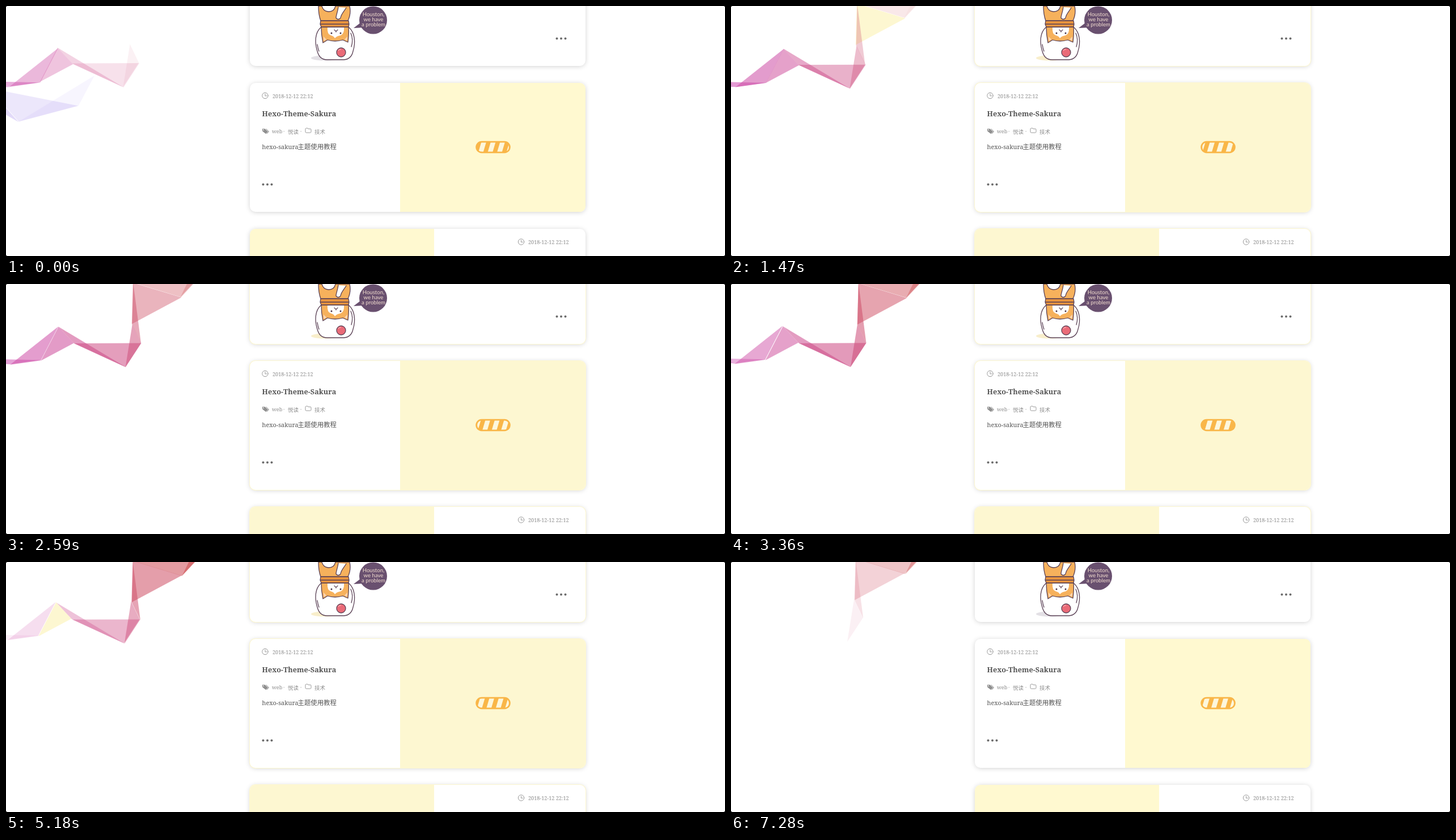
These frames come from a looping animation (1268x442 px, 7350 ms). An HTML page with a canvas:

```html
<!DOCTYPE html>
<html lang="zh">
<head>
<meta charset="utf-8">
<title>Blog cards</title>
<style>
  html, body { margin: 0; width: 100%; height: 100%; overflow: hidden; background: #fff; }
  #stage { position: relative; width: 1268px; height: 442px; overflow: hidden; --pale: #fff9d0; }
  #stage.warm { --pale: #fdf7d1; }
  canvas, svg { position: absolute; left: 0; top: 0; }
  .card {
    position: absolute; left: 430px; width: 592px; height: 228px;
    border-radius: 10px; background: #fff; overflow: hidden;
    box-shadow: 0 1px 10px -1px rgba(0, 0, 0, .22);
  }
  .warm .card { box-shadow: 0 0 0 1px var(--pale), 0 1px 10px -1px rgba(0, 0, 0, .22); }
  .cover { position: absolute; top: 0; bottom: 0; background: var(--pale); }
  text { font-family: "Noto Serif", "Noto Sans CJK SC", serif; fill: #8c8c8c; }
  .meta { font-size: 9.1px; }
  .cjk { font-family: "Noto Sans CJK SC", "Noto Sans CJK", sans-serif; font-weight: 300; }
  .tag { font-size: 9.5px; }
  .body { fill: #555; }
  .title { font-size: 12.7px; font-weight: 700; fill: #555; }
  .say { font: 9.6px Lato, sans-serif; fill: #f4dfd0; text-anchor: middle; }
  .line { fill: none; stroke: #999; stroke-width: 1; stroke-linecap: round; stroke-linejoin: round; }
  .ink { stroke: #5b4256; stroke-width: 1.3; stroke-linecap: round; stroke-linejoin: round; }
  #ground { fill: #e3e0e5; }
  .warm #ground { fill: #f8eecb; }
</style>
</head>
<body>
<div id="stage">
  <canvas id="ribbons" width="400" height="260"></canvas>
  <div class="card" style="top:-122px"></div>
  <div class="card" style="top:136px"><div class="cover" style="left:265px;right:0"></div></div>
  <div class="card" style="top:394px"><div class="cover" style="left:0;width:325px"></div></div>

  <svg width="1268" height="442" viewBox="0 0 1268 442">
    <defs>
      <g id="clock" class="line"><circle r="5.2"/><path d="M0-3V.4H2.8"/></g>
      <g id="dots" fill="#6c6c6c"><circle r="2"/><circle cx="7.5" r="2"/><circle cx="15" r="2"/></g>
      <clipPath id="inner"><rect x="831" y="241.5" width="56" height="16" rx="8"/></clipPath>
    </defs>

    <!-- cat in the jar -->
    <ellipse id="ground" cx="563" cy="92" rx="25" ry="4.6"/>
    <g class="ink">
      <path fill="#fff" d="M555 38C545 47 544 64 549 80Q553 95 566 95H596Q609 94 612 80C617 64 615 47 605 38Z"/>
      <path fill="#f6b15c" d="M551 0C551 9 552 18 555 26H603C607 18 608 9 606 0Z"/>
      <path fill="#fff" stroke="none" d="M557 0Q559 9 569 10Q579 10 581 0Z"/>
      <path fill="none" d="M557 0Q559 9 569 10Q579 10 581 0"/>
      <path fill="#fff" d="M586 2C585 10 582 17 582 21Q586 26 590 21C591 14 596 10 600 3"/>
      <path fill="#f6b15c" d="M556 37C556 46 557 56 559 65L567 60Q580 64 594 60L603 64C604 56 605 46 604 37Z"/>
      <path fill="#fff" stroke="none" d="M567 38Q566 50 573 52Q578 53 580 57Q583 53 590 52Q597 49 596 38Z"/>
      <path fill="#fbd5b5" stroke="none" d="M560.500 62L565 59L560 54ZM601.500 61.500L597 59L602 54Z"/>
      <path fill="#e8943f" d="M555 26H604L605 32H554ZM554 32H605L604 37H556Z"/>
      <path fill="none" d="M582 44V46M579 42Q580.500 44.500 582 44Q583.500 44.500 585 42M608 48Q613 59 609 72M549 68Q550 75 552 80"/>
      <circle cx="591" cy="82" r="8" fill="#ea6b78"/>
    </g>
    <path d="M586 79Q588 76 591 77" fill="none" stroke="#f7a9ae" stroke-width="1.300"/>
    <g fill="#4a3446"><circle cx="574" cy="48" r="1.500"/><circle cx="590" cy="48" r="1.500"/></g>
    <path fill="#69506f" d="M613 39L626 29L632 38Z"/>
    <circle cx="647.500" cy="25" r="24.500" fill="#69506f"/>
    <text class="say" x="648" y="18">Houston,</text>
    <text class="say" x="648" y="27">we have</text>
    <text class="say" x="648" y="36">a problem</text>
    <use href="#dots" x="971.500" y="57.500"/>

    <!-- post -->
    <use href="#clock" x="457" y="158.500"/>
    <text class="meta" x="470" y="162.500">2018-12-12 22:12</text>
    <text class="title" x="451.500" y="194.500">Hexo-Theme-Sakura</text>
    <g fill="#8f8f8f">
      <path d="M452 217H456.500L462 222L458 226L452 221Z"/>
      <path d="M458 217H459L464 222L460 226L459.300 225.300L462.700 222Z"/>
      <circle cx="454" cy="219" r=".9" fill="#fff"/>
    </g>
    <text class="meta" x="469" y="225">web</text>
    <text class="meta" x="489" y="225">·</text>
    <text class="cjk tag" x="497" y="225.500">悦读</text>
    <text class="meta" x="519" y="225">·</text>
    <path class="line" d="M528 217.500Q528 216 529.500 216H532L533 217.200H537Q538 217.200 538 218.500V222.500Q538 224 536.500 224H529.500Q528 224 528 222.500Z"/>
    <text class="cjk tag" x="544" y="225.500">技术</text>
    <text class="body" x="451.500" y="253" font-size="10.900">hexo-sakura</text>
    <text class="body cjk" x="514.500" y="253" font-size="11.400">主题使用教程</text>
    <use href="#dots" x="453.500" y="315.500"/>

    <!-- loader -->
    <rect x="828.200" y="238.800" width="61.600" height="21.400" rx="10.700" fill="#f9b648"/>
    <g clip-path="url(#inner)"><path id="stripes" fill="#fdf7dc"/></g>

    <use href="#clock" x="908.500" y="417"/>
    <text class="meta" x="921" y="420.500">2018-12-12 22:12</text>

    <path fill="#333" d="M0 0H2L0 2ZM1268 0V2L1266 0ZM0 442V440L2 442ZM1268 442H1266L1268 440Z"/>
  </svg>
</div>

<script>
const LOOP = 7350, STEP = 70;
const LIFE = 8000, GAP = 410;          // life of a section, delay to the next one
const PERIOD = 16.5, CYCLE = 1066;     // loader stripes

const stage = document.getElementById('stage');
const stripes = document.getElementById('stripes');
const ctx = document.getElementById('ribbons').getContext('2d');

// Each ribbon is a strip: three neighbouring points make one section.
const ribbons = [
  { birth: 290 - LIFE, dir: -1, color: () => 'hsl(256 72% 64%)',
    pts: [[155, 124], [127, 177], [22, 205], [-30, 146], [-80, 145]] },
  { birth: -2810, dir: 1, color: i => `hsl(${308 + 5.2 * i} 56% 55%)`,
    pts: [[-60, 139], [-35, 129], [3, 138.5], [57, 131], [88, 71], [115, 100], [206, 142],
          [233.6, 99.7], [218, 67], [220, -6], [305.5, 20], [350, -28], [336, -42]] }
];

function sections(t, warm) {
  const list = [];
  for (const { birth, dir, color, pts } of ribbons) {
    for (let i = 0; i + 2 < pts.length; i++) {
      const phase = (t - birth - i * GAP) / LIFE * Math.PI;
      if (phase <= 0 || phase >= Math.PI) continue;
      const level = Math.sin(phase);
      const drift = 10 / Math.PI * (Math.cos(1) - Math.cos(1 + phase * Math.PI / 2));
      const rising = phase < Math.PI / 2;
      const pale = warm && dir > 0 &&
        (rising ? level > .25 && level < .43 : level > .42 && level < .5);
      list.push({
        pale,
        alpha: pale ? 1 : level * .56,
        fill: pale ? '#fdf7d1' : color(i),
        tri: pts.slice(i, i + 3).map(([x, y]) => [x + dir * drift, y + drift])
      });
    }
  }
  return list.sort((a, b) => b.pale - a.pale);
}

function drawRibbons(t, warm) {
  ctx.clearRect(0, 0, 400, 260);
  for (const { alpha, fill, tri } of sections(t, warm)) {
    ctx.globalAlpha = alpha;
    ctx.fillStyle = fill;
    ctx.beginPath();
    tri.forEach(p => ctx.lineTo(...p));
    ctx.fill();
  }
}

function drawLoader(t) {
  const shift = t / CYCLE % 1 * PERIOD;
  let d = '';
  for (let k = -2; k < 4; k++) {
    const x = 840 + shift + k * PERIOD;
    d += `M${x - 1.8} 241H${x + 6.8}L${x + 1.8} 258H${x - 6.8}Z`;
  }
  stripes.setAttribute('d', d);
}

const start = performance.now();

function run() {
  const t = Math.floor((performance.now() - start) % LOOP / STEP) * STEP;
  const warm = t >= STEP && t < 6930;
  stage.classList.toggle('warm', warm);
  drawRibbons(t, warm);
  drawLoader(t);
  requestAnimationFrame(run);
}
run();
</script>
</body>
</html>
```
